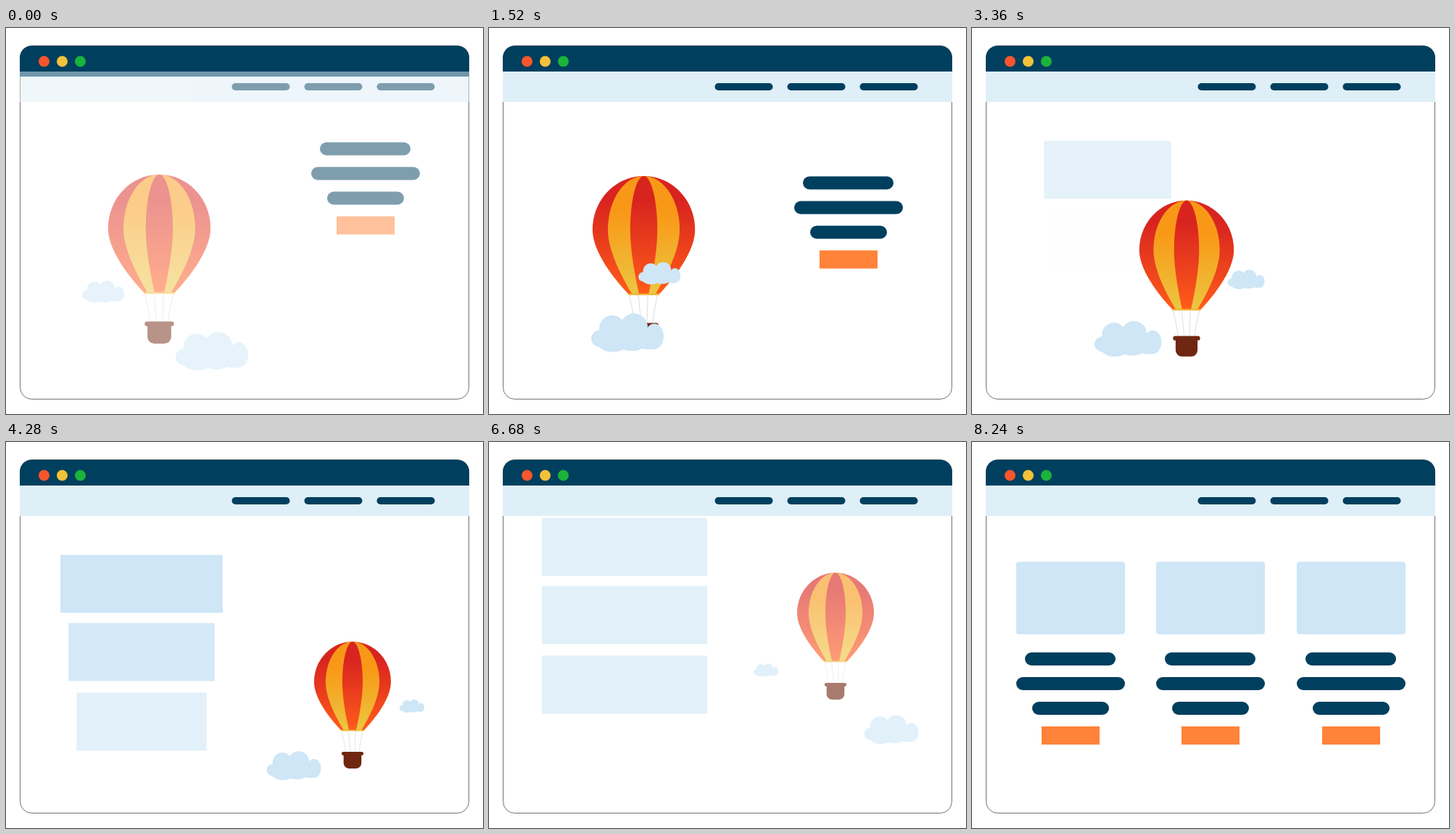
These frames come from a looping animation (658 by 532 pixels, 10 s). An HTML page:

```html
<!DOCTYPE html>
<html lang="en">
<head>
<meta charset="utf-8">
<title>Balloon page</title>
<style>
html, body { margin: 0; width: 100%; height: 100%; overflow: hidden; background: #fff; }
svg { display: block; width: 658px; height: 532px; }
</style>
</head>
<body>
<svg viewBox="0 0 658 532">
  <defs>
    <linearGradient id="red" x2="0" y2="1">
      <stop offset=".2" stop-color="#d8241f"/><stop offset="1" stop-color="#ff5c1a"/>
    </linearGradient>
    <linearGradient id="gold" x2="0" y2="1">
      <stop offset=".3" stop-color="#f99817"/><stop offset="1" stop-color="#ebc740"/>
    </linearGradient>
    <g id="cloud" fill="#cee6f6">
      <ellipse cx="-38" cy="8" rx="12" ry="11.5"/>
      <ellipse cx="-21" cy="-6" rx="18" ry="18"/>
      <ellipse cx="9" cy="-8" rx="19" ry="18.5"/>
      <ellipse cx="37" cy="5" rx="13" ry="17.5"/>
      <ellipse cx="-20" cy="13" rx="21" ry="13.5"/>
      <ellipse cx="6" cy="12" rx="22" ry="13"/>
      <ellipse cx="30" cy="12" rx="18" ry="11"/>
      <ellipse cy="5" rx="35" ry="16"/>
    </g>
    <g id="copy" fill="#003f5e">
      <rect x="-63" width="125" height="18" rx="9"/>
      <rect x="-75" y="34" width="150" height="18" rx="9"/>
      <rect x="-53" y="68" width="106" height="18" rx="9"/>
      <rect x="-40" y="102" width="80" height="25" fill="#ff8338"/>
    </g>
    <g id="card">
      <rect x="-75" width="150" height="100" rx="4" fill="#cee6f6"/>
      <use href="#copy" y="125"/>
    </g>
  </defs>

  <rect x="19.5" y="24.5" width="619" height="487" rx="16" fill="#fff" stroke="#707070"/>
  <path d="M19 67V41a16.5 16.5 0 0 1 16.5-16.5H622.5A16.5 16.5 0 0 1 639 41V67z" fill="#003f5e"/>
  <circle cx="52.5" cy="46" r="7.5" fill="#f8562c"/>
  <circle cx="77.5" cy="46" r="7.5" fill="#f3c13a"/>
  <circle cx="102.5" cy="46" r="7.5" fill="#1ab33c"/>

  <g id="nav" fill="#003f5e">
    <rect x="19" y="60" width="620" height="42" fill="#dfeff8"/>
    <rect x="311.5" y="76" width="80" height="10" rx="5"/>
    <rect x="411.5" y="76" width="80" height="10" rx="5"/>
    <rect x="511.5" y="76" width="80" height="10" rx="5"/>
  </g>

  <use id="hero" href="#copy"/>
  <g id="page">
    <g id="blocks" fill="#cee6f6">
      <rect y="155.5" height="80"/>
      <rect y="249.5" height="80"/>
      <rect y="345.5" height="80"/>
    </g>
    <g id="scene">
      <g id="balloon">
        <g transform="translate(0 -116.5)">
          <path d="M-20 164Q-15 185-12.5 203M-7.5 164L-3.5 203M5.5 164L4.5 203M19 164Q14 185 12 203" fill="none" stroke="#ddd"/>
          <path fill="url(#red)" d="M0 0C39 0 70.7 33 70.7 74C70.7 105 40 143 21 163H-21C-40 143-70.7 105-70.7 74C-70.7 33-39 0 0 0"/>
          <path fill="url(#gold)" d="M0 0C27 0 49.5 33 49.5 74C49.5 105 28 143 16 163H-16C-28 143-49.5 105-49.5 74C-49.5 33-27 0 0 0"/>
          <path fill="url(#red)" d="M0 0C10 0 18.7 33 18.7 74C18.7 105 11 143 6.5 163H-6.5C-11 143-18.7 105-18.7 74C-18.7 33-10 0 0 0"/>
          <rect x="-21.5" y="162" width="43" height="2.3" fill="#efb534"/>
          <path d="M-16.4 206H16.4V223.5A9.5 9.5 0 0 1 7 233H-7A9.5 9.5 0 0 1-16.4 223.5z" fill="#702711"/>
          <rect x="-20.2" y="202.5" width="40.4" height="6.5" rx="3.2" fill="#702711"/>
        </g>
      </g>
      <use id="big" href="#cloud"/>
      <use id="small" href="#cloud"/>
    </g>
  </g>
  <g id="cards">
    <use href="#card" x="136"/>
    <use href="#card" x="329"/>
    <use href="#card" x="523"/>
  </g>
</svg>
<script>
const $ = id => document.getElementById(id);
const ramp = (t, start, length) => Math.min(1, Math.max(0, (t - start) / length));
const pose = (el, x, y, s = 1) => el.setAttribute('transform', `translate(${x} ${y}) scale(${s})`);
const fade = (el, a) => el.setAttribute('opacity', Math.max(0, a));

// Resting points of each part: start, after first crossing, after the move, after second crossing
const parts = [
  { el: $('balloon'), x: [211.5, 214.75, 478, 478], y: [292.5, 337.5, 362.5, 318.5], size: [1, .75], dip: 0 },
  { el: $('big'), x: [284, 134, 397, 555], y: [419.5, 420.5, 446, 447.3], size: [1, .75], dip: 10 },
  { el: $('small'), x: [134, 297, 560, 382], y: [337.5, 338.7, 364, 365.3], size: [.58, .34], dip: 0 }
];

function draw(t) {
  const intro = ramp(t, 0, 1040);
  const cross1 = Math.sin(ramp(t, 1060, 1080) * Math.PI / 2);
  const move = (1 - Math.cos(Math.PI * ramp(t, 2880, 1280))) / 2;
  const cross2 = ramp(t, 5300, 1100);
  const steps = [cross1, move, cross2];
  const along = v => steps.reduce((sum, p, i) => sum + (v[i + 1] - v[i]) * p, v[0]);

  fade($('nav'), .5 + intro / 2);

  const lift = ramp(t, 2040, 892);
  pose($('hero'), 496, 204.5 - 47 * (1 - intro) - 86 * lift);
  fade($('hero'), lift > .86 ? 0 : (.5 + intro / 2) * (1 - lift));

  const leave = ramp(t, 6340, 1000);
  pose($('page'), 0, -150 * leave);
  fade($('page'), 1 - leave / .867);

  pose($('scene'), 0, 26 * (1 - intro));
  fade($('scene'), .5 + intro / 2);
  for (const { el, x, y, size, dip } of parts)
    pose(el, along(x), along(y) + 4 * dip * cross2 * (1 - cross2), size[0] + (size[1] - size[0]) * move);

  [...$('blocks').children].forEach((el, i) => {
    const p = ramp(t, 2910 + 425 * i, 1450), w = 152 + 76 * p;
    el.setAttribute('x', 187 - w / 2);
    el.setAttribute('width', w);
    fade(el, 1 - (1 - p) ** 2);
  });

  const arrive = ramp(t, 7040, 1200);
  pose($('cards'), 0, 165 + 150 * (1 - arrive));
  fade($('cards'), arrive);
}

function tick() {
  draw(Math.floor(performance.now() % 10000 / 40) * 40);
  requestAnimationFrame(tick);
}
tick();
</script>
</body>
</html>
```
